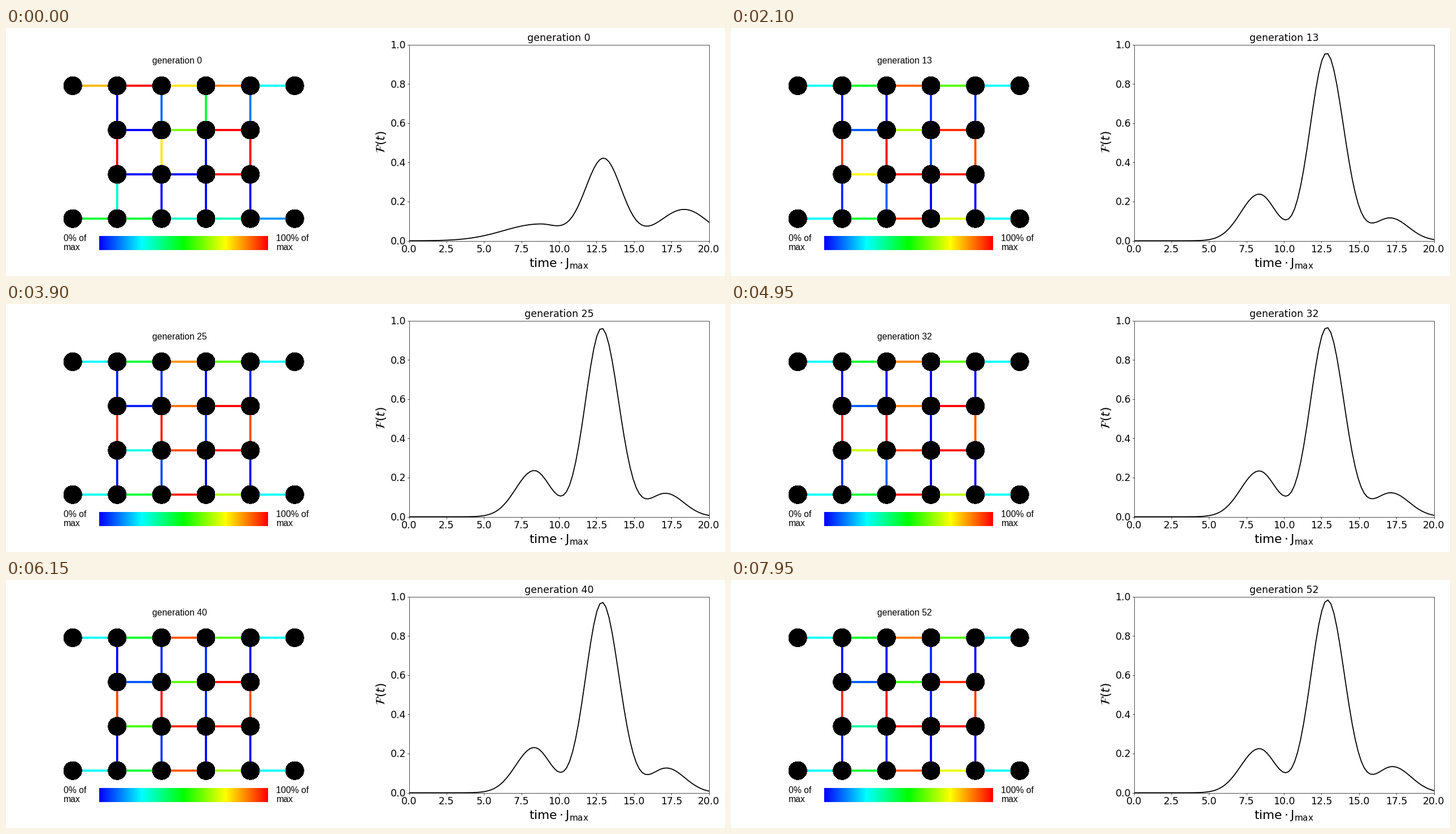
These frames come from a looping animation (1273 px wide and 440 px high, 8 s). A matplotlib script:

```python
import numpy as np
import matplotlib.pyplot as plt
from matplotlib.animation import FuncAnimation
from matplotlib.collections import LineCollection
from matplotlib.colors import LinearSegmentedColormap
from matplotlib.patches import Circle, Rectangle

W, H, DPI = 1273, 440, 64
PX = 72 / DPI                      # points per pixel
STEP, FRAMES = 50, 160             # ms per frame, frames per loop
HOLD = 3                           # frames per generation
SETTLE, LAST = 7, 52               # generations

XS = 118.2 + 78.6 * np.arange(6)
YS = 102.4 + 78.6 * np.arange(4)
LEFT, RIGHT, TOP, BOTTOM = 713.5, 1244.5, 29.5, 377.5

rainbow = LinearSegmentedColormap.from_list(
    "rainbow", ["#0000ff", "#00ffff", "#00ff00", "#ffff00", "#ff0000"], N=512)

# couplings: four horizontal rows, then three vertical ones
START = np.array([.82, 1, .77, .88, .26, 0, .62, 1, 0, 0, 1,
                  .45, .45, .3, .32, .15,
                  0, .1, .45, .12, 1, .77, 0, 1, .3, 0, 0, 0])
SETTLED = np.array([.26, .46, .88, .58, .26, .05, .6, 1, .5, .95, 1,
                    .26, .45, .95, .69, .26,
                    .02, .02, .02, .04, .96, 1, .03, .92, .02, .06, 0, 0])
# outer chains hardly change, two inner links never settle
SPREAD = np.full(28, .04)
SPREAD[[0, 1, 3, 4, 11, 12, 15, 26, 27]] = .005
SPREAD[[6, 8]] = .3

# peaks: amplitude, centre, left width, right width
FIRST = np.array([(.085, 8.7, 2.4, 1.4),
                  (.42, 12.97, 1.22, 1.2),
                  (.16, 18.35, 1.65, 1.62)])
TUNED = np.array([(.239, 8.35, 1.23, 1.1),
                  (.955, 12.83, 1.08, 1.14),
                  (.115, 17.08, 1.1, 1.2)])
DRIFT = np.array([(-.014, 0, 0, 0), (.028, .07, .02, 0), (.018, .17, 0, .03)])

fig = plt.figure(figsize=(W / DPI, H / DPI), dpi=DPI, facecolor="white")
ax = fig.add_axes([0, 0, 1, 1])


def px(t, f):
    return LEFT + (RIGHT - LEFT) * t / 20, BOTTOM + (TOP - BOTTOM) * f


def label(x, y, s, size, font="DejaVu Sans", **kw):
    kw = {"ha": "center", "va": "baseline", **kw}
    return ax.text(x, y, s, fontsize=size * PX, family=font, **kw)


def side_label(x, y, s):
    return label(x, y, s, 15.7, "Liberation Sans", ha="left")


def stroke(xs, ys, width=.7):
    return ax.plot(xs, ys, color="black", lw=width * PX)[0]


# lattice
links = []
for y, cols in zip(YS, (range(5), range(1, 4), range(1, 4), range(5))):
    links += [[(XS[c], y), (XS[c + 1], y)] for c in cols]
for y0, y1 in zip(YS, YS[1:]):
    links += [[(x, y0), (x, y1)] for x in XS[1:5]]
edges = ax.add_collection(
    LineCollection(links, linewidths=3.8 * PX, zorder=1, snap=False))
for r, y in enumerate(YS):
    for x in XS if r in (0, 3) else XS[1:5]:
        ax.add_patch(Circle((x, y), 16, color="black", lw=0, zorder=2,
                            antialiased=False))

# colour scale
ax.imshow(np.linspace(0, 1, 299)[None, :], cmap=rainbow, aspect="auto",
          extent=(165, 464, 394, 369))
for x, s in ((101.7, "0% of"), (478.5, "100% of")):
    side_label(x, 378.5, s)
    side_label(x, 394, "max")
net_title = side_label(259, 63, "")

# chart
frame = ax.add_patch(Rectangle((LEFT, TOP), RIGHT - LEFT, BOTTOM - TOP,
                               fill=False, ec="black", lw=.7 * PX))
for t in np.arange(0, 20.1, 2.5):
    x, _ = px(t, 0)
    stroke([x, x], [BOTTOM, BOTTOM + 3])
    label(x, 398.5, f"{t:.1f}", 17.4)
for f in np.arange(0, 1.1, .2):
    _, y = px(0, f)
    stroke([LEFT - 3, LEFT], [y, y])
    label(708, y + 6.5, f"{f:.1f}", 17.4, ha="right")
label(979, 424, r"$\mathrm{time}\cdot\mathrm{J}_{\mathrm{max}}$", 21.8)
label(664.5, 202.5, r"$\mathcal{F}(t)$", 21.8, va="center", rotation=90)
plot_title = label(979, 23, "", 17.4)
times = np.linspace(0, 20, 100)
curve = stroke([], [], 1.8)
curve.set_clip_path(frame)

ax.set_xlim(0, W)
ax.set_ylim(H, 0)
ax.axis("off")


def couplings(gen, progress):
    """Each link jumps on its own to a value near its settled one."""
    rng = np.random.default_rng(gen)
    found = np.clip(SETTLED + SPREAD * rng.uniform(-1, 1, 28), 0, 1)
    return np.where(rng.random(28) < progress, found, START)


def fidelity(gen, progress):
    tuned = TUNED + DRIFT * (gen / LAST) ** 2
    total = np.zeros_like(times)
    for amp, mid, left, right in FIRST + (tuned - FIRST) * progress:
        width = np.where(times < mid, left, right)
        total += amp * np.exp(-((times - mid) / width) ** 2 / 2)
    return total


def update(i):
    gen = max(0, i // HOLD - 1)
    progress = 1 - (1 - min(gen / SETTLE, 1)) ** 2
    edges.set_color(rainbow(couplings(gen, progress)))
    curve.set_data(*px(times, fidelity(gen, progress)))
    for title in (net_title, plot_title):
        title.set_text(f"generation {gen}")
    return edges, curve, net_title, plot_title


anim = FuncAnimation(fig, update, frames=FRAMES, interval=STEP,
                     repeat=True, repeat_delay=0, blit=False)
plt.show()
```
